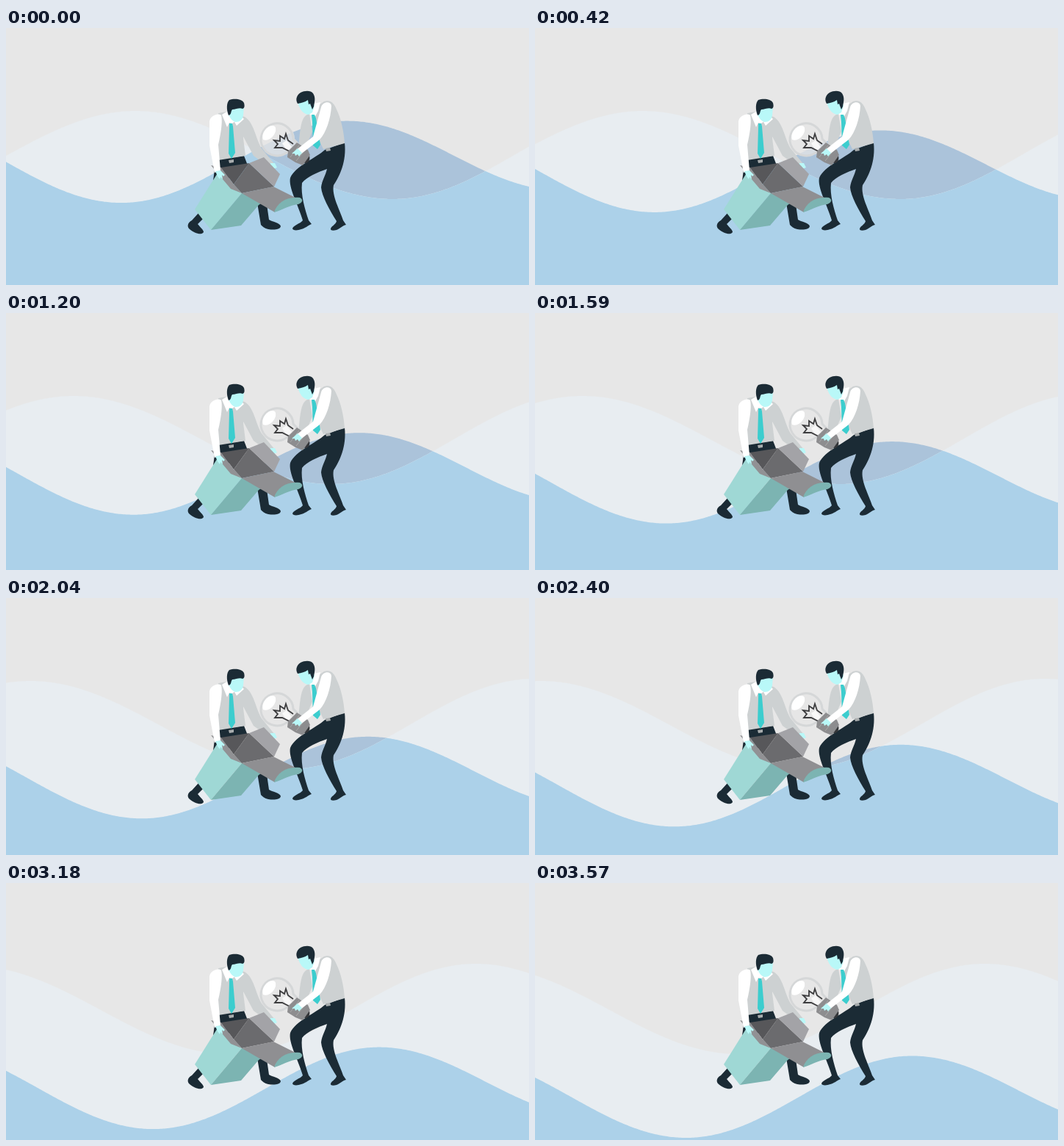
Animation, 712 px wide and 350 px high, one loop 3.6 s. Source, as an HTML page with a canvas:

```html
<!DOCTYPE html>
<html lang="en">
<head>
<meta charset="utf-8">
<title>Waves</title>
<style>
html, body { margin: 0; width: 712px; height: 350px; overflow: hidden; background: #e7e7e7; }
canvas { display: block; }
</style>
</head>
<body>
<canvas id="stage" width="712" height="350"></canvas>
<script>
const W = 712, H = 350, LOOP = 3600, STEP = 30;
const ctx = document.getElementById('stage').getContext('2d');

// Crests and troughs, joined by half cosines.
const BACK_WAVE = [[-172, 233], [176, 113], [527, 233], [862, 110], [1207, 233]];
const FRONT_WAVE = [[-157, 126.6], [157, 238.1], [464.5, 126.6], [754.5, 220.8]];

const DARK = '#1b2b35', SHIRT = '#cdd1d2', WHITE = '#fff', SKIN = '#b9f8f8', TIE = '#3ccdce';
const TEAL = '#9fd8d5', DEEP_TEAL = '#7cb4b2', BUCKLE = '#a9adae';

function heightAt(points, x) {
  let i = 1;
  while (i < points.length - 1 && points[i][0] < x) i++;
  const [x0, y0] = points[i - 1], [x1, y1] = points[i];
  return y0 + (y1 - y0) * (1 - Math.cos(Math.PI * (x - x0) / (x1 - x0))) / 2;
}

function wavePath(points, dx, dy) {
  const path = new Path2D();
  path.moveTo(-2, H + 2);
  for (let x = -2; x <= W + 2; x += 2) path.lineTo(x, heightAt(points, x - dx) + dy);
  path.lineTo(W + 2, H + 2);
  path.closePath();
  return path;
}

function drawWaves(seconds) {
  const back = wavePath(BACK_WAVE, -70 * seconds, 0);
  const front = wavePath(FRONT_WAVE, 13.7 * seconds, 30.5 * seconds);
  ctx.fillStyle = '#e7e7e7';
  ctx.fillRect(0, 0, W, H);
  ctx.fillStyle = '#abc3da';
  ctx.fill(front);
  ctx.save();
  ctx.clip(back);
  ctx.fillStyle = '#e8edf1';
  ctx.fillRect(0, 0, W, H);
  ctx.fillStyle = '#acd1e9';
  ctx.fill(front);
  ctx.restore();
}

const shape = (color, d) => ({ color, path: new Path2D(d) });
const line = (color, width, d) => ({ color, width, path: new Path2D(d) });

const leftMan = [
  shape(SHIRT, 'M321 120C328 121 332 127 335 133C340 143 342 154 348 164L366 186L359 190L337 174L321 144Z'),
  shape(SKIN, 'M360 184L366 184L369 190L364 192L359 189Z'),
  shape(DARK, 'M289 179L324 174L329 187L306 204L282 208L284 193Z'),
  shape(DARK, 'M263 251L253 262C247 265 246 271 250 274C256 279 266 283 269 278C269 275 265 272 261 267L270 258L280 250Z'),
  shape(DARK, 'M342 238L355 240L358 261C362 264 373 265 374 270C373 275 364 275 357 274C352 273 349 270 347 268Z'),
  shape(SHIRT, 'M289 116L305 113L323 121L323 150L326 174L289 180Z'),
  shape(WHITE, 'M294 118L302 113L312 127L308 130L304 129L301 135Z'),
  shape(WHITE, 'M321 121L324 124L314 133L311 128Z'),
  shape(SKIN, 'M303 108L324 107L323 119C322 125 318 128 313 128C309 128 304 122 303 117Z'),
  shape(DARK, 'M303 119C300 111 300 102 304 98C310 96 321 96 324 102C325 106 325 109 322 110C318 108 313 111 308 111C306 113 307 116 305 118Z'),
  shape(TIE, 'M304 130L308 130L309 134L312 170L307 178L303 171L304 135Z'),
  shape(BUCKLE, 'M303 180L310 179L310 183L304 184Z')
];

const box = [
  shape(TEAL, 'M289 196L257 247L279 275L321 225L300 203Z'),
  shape(DEEP_TEAL, 'M321 225L279 275L320 269L344 241L364 228Z'),
  shape('#57575a', 'M293 190L331 184L310 213Z'),
  shape('#6b6b6e', 'M331 184L365 216L321 225L310 213Z'),
  shape('#919194', 'M279 187L293 190L310 213L321 225L306 219Z'),
  shape('#a3a3a7', 'M331 184L351 176L373 199L365 216Z'),
  shape('#8f8f92', 'M321 225L364 216L394 231C382 233 371 241 366 251Z'),
  shape(DEEP_TEAL, 'M365 251C369 238 382 229 400 231C405 233 404 238 398 240C386 241 376 248 365 251Z')
];

const leftArm = [
  shape(WHITE, 'M277 127C278 119 290 115 293 119C295 126 293 142 289 159L292 194L284 197L277 160Z'),
  shape(SKIN, 'M285 195L292 194L298 200L296 202L294 200L295 206L292 203L291 206L288 202Z')
];

const rightManBack = [
  shape(SHIRT, 'M413 117C404 119 402 128 400 143L398 163L407 165L417 141Z'),
  shape(DARK, 'M434 166L461 156C464 182 454 202 446 214C443 228 455 249 459 262L463 268C458 269 455 273 450 275C446 276 442 276 442 274C442 270 449 268 450 263C440 247 430 229 429 217C430 208 435 201 437 192C425 196 409 203 403 211C401 227 407 247 412 262L416 267C411 269 407 273 402 274C397 276 390 276 390 273C392 268 400 267 404 262C398 241 384 217 387 204C394 188 422 177 434 166Z'),
  shape(SHIRT, 'M414 113L433 100C441 97 447 102 450 111C456 123 460 141 461 157L432 165L424 148Z'),
  shape(WHITE, 'M419 103L428 101L425 113L420 122L413 117Z'),
  shape(SKIN, 'M397 101L416 96L420 106L417 115L412 118C404 117 400 111 397 101Z'),
  shape(DARK, 'M397 103C394 98 395 92 401 88C407 85 415 85 418 89C422 95 420 101 419 107L417 111L414 103L412 104L411 98C407 101 402 102 397 103Z'),
  shape(TIE, 'M416 118L420 118L422 123L428 159L424 165L418 160L417 128Z'),
  shape(BUCKLE, 'M435 164L441 163L442 167L436 168Z')
];

const bulb = [
  shape('rgba(230,230,230,.75)', 'M347 151A23 23 0 0 1 393 151L398 157L385 171L375 174A23 23 0 0 1 347 151Z'),
  line('#d5d7d8', 3, 'M385 167A22 22 0 1 1 391 151L397 157'),
  shape(WHITE, 'M350 152C346 142 359 129 366 134C371 142 359 156 350 152Z'),
  shape('#f8f8f8', 'M376 157L382 153L389 162L383 168Z'),
  line('#3c3c3e', 1.8, 'M386 168L376 163L366 163L370 158L365 153L373 154L373 147L379 151L381 144L384 153L391 158'),
  shape('#343639', 'M404 183L413 174C415 181 410 186 404 183Z'),
  shape('#8d8d8f', 'M384 168L396 156L411 166L414 173L404 187L394 183L383 176Z'),
  line('#aaa', 1, 'M387 176L399 160M395 181L407 166')
];

const rightArm = [
  shape(WHITE, 'M429 108C431 100 442 99 443 106C442 124 436 142 427 152L401 172L395 166L418 148Z'),
  shape(SKIN, 'M397 164L403 170L399 175L397 172L394 174L393 171L389 171Z')
];

const figures = [...leftMan, ...rightManBack, ...box, ...leftArm, ...bulb, ...rightArm];

function drawShape({ color, width, path }) {
  if (width) {
    ctx.strokeStyle = color;
    ctx.lineWidth = width;
    ctx.stroke(path);
  } else {
    ctx.fillStyle = color;
    ctx.fill(path);
  }
}

// Motion ticks every 30 ms and rests for one tick in each 1080 ms.
function steppedTime(now) {
  const t = Math.floor(now % LOOP / STEP) * STEP;
  return t % 1080 === 540 ? t - STEP : t;
}

function render(now) {
  drawWaves(steppedTime(now) / 1000);
  figures.forEach(drawShape);
}

const start = performance.now();
function tick() {
  render(performance.now() - start);
  requestAnimationFrame(tick);
}
tick();
</script>
</body>
</html>
```
